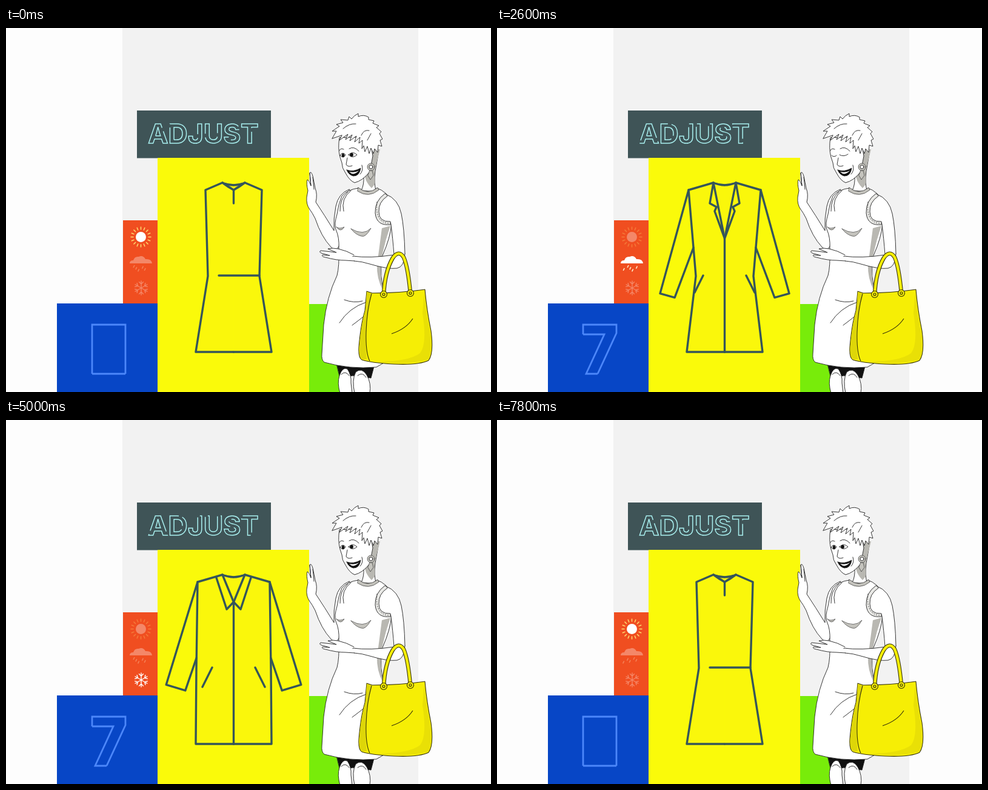
These frames come from a looping animation (800 by 600 pixels, 8000 ms). An HTML page:

```html
<!DOCTYPE html>
<html lang="en">
<head>
<meta charset="utf-8">
<title>Adjust</title>
<style>
  html, body { margin: 0; width: 100%; height: 100%; overflow: hidden; background: #fdfdfd; }
  svg { display: block; width: 800px; height: 600px; }
  .word { font: 700 44.500px Inter, "Open Sans", sans-serif; text-anchor: middle; fill: none;
    stroke: #a9f0f0; stroke-width: 1.5; stroke-dasharray: 62 6; }
  .garment { fill: none; stroke: #35555a; stroke-width: 3.4; stroke-linejoin: round; stroke-linecap: round; }
  .digit { fill: none; stroke: #4c87fa; stroke-width: 2.8; }
  .ink { fill: #fff; stroke: #222; stroke-width: .9; stroke-linejoin: round; stroke-linecap: round; }
  .line { fill: none; }
  .shade { fill: #b9b8b2; stroke: none; }
  .soft { fill: #c4c3bd; stroke-width: .6; }
  .band { fill: #e9e9e6; }
  .black { fill: #111; }
  .bag { fill: #f6ee05; stroke: #35320a; stroke-width: 1.1; stroke-linejoin: round; }
  .icon { fill: #fff; stroke: #fff; }
</style>
</head>
<body>
<svg viewBox="0 0 800 600">
  <rect x="192" width="488" height="600" fill="#f2f2f2"/>
  <rect x="500" y="455" width="60" height="145" fill="#78ec0a"/>
  <rect x="216" y="136" width="221" height="78.500" fill="#3f5457"/>
  <text id="word" class="word" x="325.500" y="190">ADJUST</text>
  <rect x="193" y="317" width="57" height="137" fill="#f04e20"/>

  <g id="sun" class="icon">
    <circle cx="222.500" cy="344.500" r="8.500" stroke="none"/>
    <path id="rays" stroke="#ffdc70" stroke-width="1.500"/>
  </g>
  <g id="rain" class="icon">
    <path stroke="none" d="M204 388Q204 383 210 383Q212 376 219 377Q226 374 230 381Q240 380 241 388Z"/>
    <path id="drops" fill="none" stroke="#fff0d0" stroke-width="1.500"/>
  </g>
  <g id="snow" class="icon">
    <path id="flake" fill="none" stroke-width="1.400"/>
  </g>

  <rect x="84" y="454" width="166" height="146" fill="#0746c6"/>
  <path id="digit" class="digit"/>

  <rect x="250" y="214" width="250" height="386" fill="#fafa0a"/>
  <g class="garment">
    <g id="half">
      <path id="side" fill="#faf70b"/>
      <path id="trim"/>
    </g>
    <use href="#half" transform="translate(751) scale(-1 1)"/>
    <path id="front"/>
  </g>

  <!-- legs -->
  <g class="ink">
    <path class="black" d="M546 556L607 558L602 577L572 573L551 577Z"/>
    <path d="M551 602Q546 585 550 573Q555 558 563 562Q570 572 569 585L571 602"/>
    <path d="M575 602Q570 580 577 567Q587 559 595 572Q603 586 600 602"/>
    <path class="line" d="M553 571Q560 564 566 573M580 573Q588 566 594 576"/>
  </g>

  <!-- raised arm -->
  <g class="ink">
    <path d="M566 266Q548 273 544 294Q540 314 541 334Q525 308 511 287Q514 274 510 264L506 244Q503 235 501 239L503 260Q499 250 497 250Q495 256 498 268L496 279Q495 291 501 299Q505 304 510 314Q520 344 536 361Q544 370 549 360Z"/>
    <path class="line" d="M501 239L503 260M506 246L508 266"/>
  </g>

  <!-- neck and dress -->
  <g class="ink">
    <path d="M590 244Q591 258 586 268L611 270Q606 257 609 236L615 202L600 203Z"/>
    <path class="shade" d="M605 199L617 200L612 219L608 237L608 258L603 264Q594 255 592 245L601 236Z"/>
    <path d="M581 264Q564 266 554 277Q548 291 546 307Q541 323 544 332Q550 345 549 363Q550 393 546 408Q529 443 524 489L521 537Q520 547 525 551Q567 563 611 559L630 548L626 445Q614 407 621 375Q634 346 636 322L627 273Q619 266 612 264Q598 276 581 264Z"/>
    <path class="shade" d="M620 330L634 326Q626 349 621 372Q615 397 622 433Q611 413 612 390Q616 361 620 330Z"/>
    <path class="soft" d="M581 263Q597 276 613 263L615 267Q598 281 580 269Z"/>
    <path class="soft" d="M545 328Q552 338 558 328Q550 332 545 328ZM569 331Q590 343 602 330Q593 346 586 343Q577 341 569 331Z"/>
    <path class="line" d="M569 268Q552 281 557 302M564 270Q550 282 551 302M558 448Q574 454 588 450M550 486Q566 461 594 452M571 490L592 474"/>
  </g>

  <!-- carrying arm -->
  <g class="ink">
    <path stroke="none" d="M627 274Q647 282 652 306Q657 330 658 372L649 394L638 378Q638 344 635 324Q614 326 612 305Q609 285 627 274Z"/>
    <path class="line" d="M627 274Q647 282 652 306Q657 330 658 372M640 374Q638 346 635 324"/>
    <path class="band" d="M625 273Q608 285 609 305Q611 327 635 324L634 319Q615 320 615 303Q614 287 629 277Z"/>
    <path class="line" stroke-dasharray="1 3" d="M612 287Q608 323 635 322"/>
    <path id="hand" d="M574 374Q562 367 548 364Q538 362 531 364Q540 368 545 370L519 367Q516 369 520 371L534 375L522 374Q520 377 527 378Q545 383 560 383L575 384"/>
    <path d="M640 374Q600 380 572 376L574 384Q588 385 600 389Q630 398 645 396Q657 394 658 372"/>
    <path stroke="#fff" stroke-width="2.500" d="M573 378L573.500 382"/>
  </g>

  <!-- head -->
  <g class="ink">
    <path d="M550 181Q547 198 551 213L554 222Q554 231 560 239Q567 252 575 255Q588 252 600 237L605 211L600 180Z"/>
    <path class="line" d="M550 202Q552 197 557 200M566 199Q574 194 582 203M563 214L561 225Q564 230 571 227M587 226Q590 235 584 241"/>
    <path class="black" d="M562 234Q573 238 585 231Q583 244 573 244Q565 242 562 234Z"/>
    <path stroke="none" d="M566 237Q576 239 582 235Q576 242 570 240Z"/>
    <g id="open">
      <path d="M551 210Q555 203 560 209Q557 216 551 210ZM565 209Q572 202 579 209Q572 216 565 209Z"/>
      <ellipse class="black" cx="556" cy="210" rx="2" ry="3"/>
      <ellipse class="black" cx="570" cy="209" rx="2.500" ry="3"/>
    </g>
    <path id="shut" class="line" d="M552 210Q556 214 560 210M565 209Q572 213 579 208"/>
    <path d="M538 182L545 170L538 170L550 162L545 159L556 156L552 151L564 152L566 146L570 150Q574 144 581 141L581 146Q590 142 598 147L598 151L607 153L605 157L615 161L611 164L619 171L616 174L621 183L617 185L620 195L614 193L613 205L608 199L606 207L602 198L599 207L596 195L592 204L590 194L587 199L588 185L582 190L584 180L575 188L578 178L567 186L571 176L560 184L564 175L550 185L554 177Z"/>
    <path class="line" d="M556 166Q566 157 577 158M586 177Q590 167 599 169M596 185L602 174"/>
    <path class="soft" d="M600 235L604 235L606 243L601 250L597 243Z"/>
    <circle class="soft" cx="602" cy="229" r="6"/>
    <circle cx="602" cy="229" r="3"/>
  </g>

  <g id="bag" class="bag">
    <path id="strap" fill="none" stroke-width="6.600" d="M623 439Q625 401 638 379Q648 365 656 378Q663 394 667 437"/>
    <use href="#strap" style="stroke:#f6ee05" transform="translate(0 0)"/>
    <path id="strapFill" fill="none" stroke="#f6ee05" stroke-width="4.400"/>
    <path d="M595 434L604 437Q650 437 691 431Q694 465 701 499Q706 536 697 548Q681 556 639 554Q602 552 587 547Q581 544 582 526Q585 489 592 466Z"/>
    <path fill="#ded608" stroke="none" d="M595 435L603 438L594 482Q592 522 595 546L587 546Q581 537 583 522Q586 486 593 464Z"/>
    <path fill="#e9e006" stroke="none" d="M690 434Q693 474 700 502Q705 536 696 547Q663 556 611 550Q664 550 683 536Q695 521 687 470Z"/>
    <path fill="none" d="M603 438Q595 466 594 501Q593 535 600 549M636 504Q660 496 671 479"/>
    <g id="ring"><circle cx="623" cy="439" r="5.500"/><circle cx="623" cy="439" r="2"/></g>
    <use href="#ring" x="44" y="-2"/>
  </g>
</svg>
<script>
const LOOP = 8000, STEP = 200, MID = 375.5;
const $ = id => document.getElementById(id);
const draw = (id, d) => $(id).setAttribute('d', d);
const lerp = (a, b, k) => a + (b - a) * k;
const clamp = k => Math.min(1, Math.max(0, k));
const ease = k => k < .5 ? 4 * k ** 3 : 1 - 4 * (1 - k) ** 3;
const phase = (t, start, span = 1000) => ease(clamp((t - start) / span));
const line = (...pts) => 'M' + pts.map(p => p.join(' ')).join('L');

// x positions are for the left half; angle is the sleeve's swing in degrees
const dress = { shoulder: 329, waist: 333, angle: 0, cuff: 0, armpit: 409, collar: 357,
  tipX: 367, tipY: 262, notch: 0, vee: 267, placket: 289, pocket: 0, belt: 351 };
const blazer = { shoulder: 316, waist: 328, angle: 15.4, cuff: 25, armpit: 362, collar: 357,
  tipX: 351, tipY: 289, notch: 1, vee: 347, placket: 534, pocket: 28, belt: 530 };
const coat = { shoulder: 316, waist: 314, angle: 17, cuff: 33, armpit: 392, collar: 347,
  tipX: 364, tipY: 312, notch: 0, vee: 300, placket: 534, pocket: 32, belt: 530 };
const wardrobe = [dress, blazer, coat];
const blend = (a, b, k) =>
  Object.fromEntries(Object.keys(a).map(key => [key, lerp(a[key], b[key], k)]));

function drawClothes(g) {
  const neck = [357, 255], shoulder = [g.shoulder, 267], waist = [g.waist, 409], vee = [MID, g.vee];
  draw('side', `M${MID} 259Q366 259 357 255` + line(neck, shoulder, waist, [313, 534], [MID, 534]).replace('M', 'L'));

  const lapel = [[g.collar, 255 + (357 - g.collar) / 2], [g.tipX, g.tipY],
    [g.tipX + 11 * g.notch, g.tipY + 6 * g.notch], [g.tipX + 8 * g.notch, g.tipY + 13 * g.notch], vee];
  let trim = line(...lapel) + line(neck, vee);
  if (g.cuff > 1) {
    const a = g.angle * Math.PI / 180, sin = Math.sin(a), cos = Math.cos(a);
    const hand = [g.shoulder - 177 * sin, 267 + 177 * cos];
    const inner = [hand[0] + g.cuff * cos, hand[1] + g.cuff * sin];
    const armpit = [lerp(g.shoulder, g.waist, (g.armpit - 267) / 142), g.armpit];
    trim += line(shoulder, hand, inner, armpit);
  }
  if (g.pocket > 8) trim += line([340, 408], [340 - g.pocket / 2, 408 + g.pocket]);
  draw('trim', trim);

  const end = 2 * MID - g.waist;
  draw('front', line(vee, [MID, g.placket]) + (g.belt < end ? line([g.belt, 408], [end, 408]) : ''));
}

// m = 0 is a seven, m = 1 a box; the outline opens up on the way
function drawDigit(m) {
  const gap = Math.sin(Math.PI * m), quick = clamp(2 * m);
  const left = lerp(147, 142, m), foot = lerp(166, 197, quick);
  const elbow = [lerp(177, left, m * m), lerp(505, 570, m * m)];
  const arm = [lerp(142, elbow[0], quick), elbow[1]];
  draw('digit',
    line([142, lerp(505, 570, m)], [142, 489], [197, 489], [197, 503], [lerp(166, 197, m), 570 - 29 * gap])
    + line(arm, elbow, [left, 570], [foot, 570], [foot - 10 * gap, 570 - 23 * gap]));
}

function spokes(n, cx, cy, r0, r1, twig) {
  let d = '';
  for (let i = 0; i < n; i++) {
    const a = i * 2 * Math.PI / n + Math.PI / 2;
    const p = (r, turn = 0) => [cx + r * Math.cos(a + turn), cy + r * Math.sin(a + turn)];
    d += line(p(r0), p(r1));
    if (twig) d += line(p(r1 - 1, .35), p(r1 * .55), p(r1 - 1, -.35));
  }
  return d;
}

function drops(t) {
  let d = '';
  for (let i = 0; i < 5; i++) {
    const k = (t / 1000 + i * .4) % 1;
    d += `M${212 + i * 5 - k * 3} ${391 + k * 8}l-2 4`;
  }
  return d;
}

function render(t) {
  // three changes of weather, each with its own outfit
  const p = [0, 1, 2].reduce((sum, i) => sum + phase(t, 700 + 2600 * i), 0);
  const i = Math.floor(p);
  drawClothes(blend(wardrobe[i % 3], wardrobe[(i + 1) % 3], p - i));
  ['sun', 'rain', 'snow'].forEach((id, n) => {
    const far = Math.abs(p - n), near = clamp(1 - Math.min(far, 3 - far));
    $(id).setAttribute('opacity', lerp(.32, 1, near));
  });
  draw('drops', drops(t));
  drawDigit(1 - phase(t, 700) + phase(t, 5325));

  const sway = ease(clamp((800 - Math.abs(Math.abs(t - 4000) - 2200)) / 400));
  $('hand').setAttribute('transform', `rotate(${-28 * sway} 574 380)`);
  $('bag').setAttribute('transform', `translate(${-2 * sway} ${sway})`);

  const blink = t % 4000 === 2600;
  $('open').style.display = blink ? 'none' : '';
  $('shut').style.display = blink ? '' : 'none';
  $('word').style.strokeDashoffset = 12 * (1 - Math.cos(2 * Math.PI * t / LOOP));
}

draw('rays', spokes(16, 222.5, 344.5, 12, 17));
draw('flake', spokes(6, 223, 428.5, 0, 12, true));
draw('strapFill', $('strap').getAttribute('d'));
document.querySelector('#bag use').remove();

const start = performance.now();
function tick() {
  const t = Math.max(0, performance.now() - start) % LOOP;
  render(Math.floor(t / STEP) * STEP);
  requestAnimationFrame(tick);
}
tick();
</script>
</body>
</html>
```
